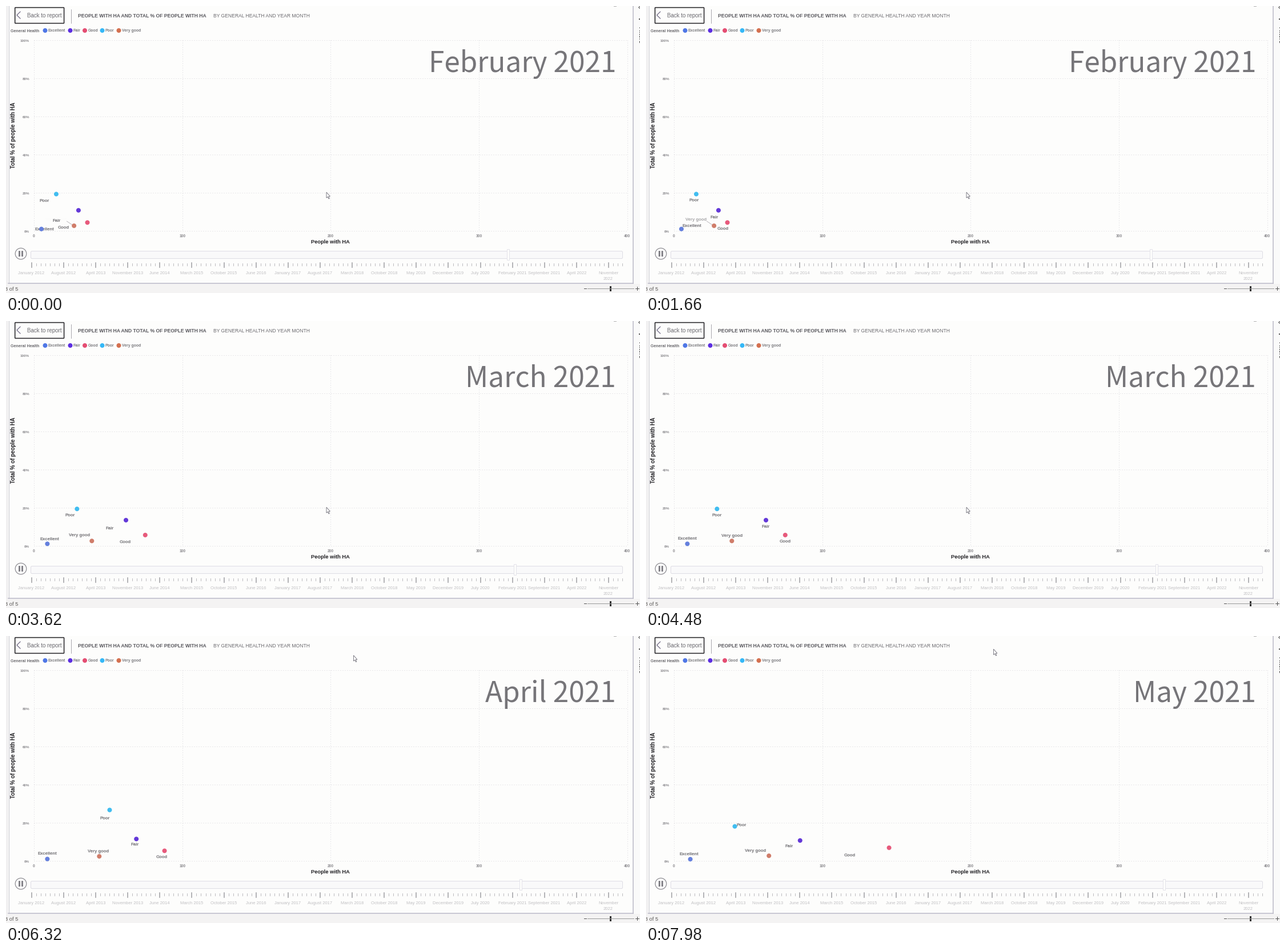
These frames come from a looping animation (1110x504 px, 8 s). A matplotlib script:

```python
import numpy as np
import matplotlib.pyplot as plt
from matplotlib.animation import FuncAnimation
from matplotlib.patches import Circle, Polygon, Rectangle, FancyBboxPatch

W, H, DPI = 1110, 504, 96
PX = 72 / DPI                      # points per pixel
STEP, LOOP = 20, 8000              # ms
MONTH_MS, GLIDE_MS, LEAD_MS = 2300, 2050, 20
PAPER = "#fdfdfc"

plt.rcParams["font.family"] = "Liberation Sans"
fig = plt.figure(figsize=(W / DPI, H / DPI), dpi=DPI, facecolor=PAPER)


def stage():
    ax = fig.add_axes([0, 0, 1, 1])
    ax.set(xlim=(0, W), ylim=(H, 0))
    ax.axis("off")
    return ax


def text(ax, x, y, s, size, color, ha="center", **kw):
    """Text whose capitals are vertically centred on y; size in pixels."""
    return ax.text(x, y + 0.36 * size, s, fontsize=size * PX, color=color,
                   ha=ha, va="baseline", **kw)


def line(ax, xs, ys, color, width=1, **kw):
    return ax.plot(xs, ys, color=color, lw=width * PX, **kw)[0]


def box(ax, x0, y0, x1, y1, fill="none", edge="none", width=1, **kw):
    return ax.add_patch(Rectangle((x0, y0), x1 - x0, y1 - y0, facecolor=fill,
                                  edgecolor=edge, lw=width * PX, **kw))


def chart_xy(people, percent):
    return 49 + 2.597 * np.asarray(people), 395.3 - 3.35 * np.asarray(percent)


NAMES = ["Excellent", "Fair", "Good", "Poor", "Very good"]


def draw_window(ax):
    box(ax, 0, 0, 4, H, "#f1f0f1")
    box(ax, 1099, 0, W, H, "#fafafa")
    box(ax, 0, 488, W, H, "#f4f3f3")
    line(ax, [4.5, 4.5], [0, 487], "#c8c7d0")
    line(ax, [1098, 1098], [0, 487], "#b9b7c6", 1.5)
    line(ax, [4, 1098], [487, 487], "#b9b7c6", 1.5)
    text(ax, 21, 497, "3 of 5", 9.4, "#605e5c", "right")
    line(ax, [1012, 1016], [495.5, 495.5], "#555555")
    line(ax, [1018, 1099], [495.5, 495.5], "#9a9a9a")
    box(ax, 1057, 492, 1060, 501, "#333333")
    line(ax, [1102, 1108], [495.5, 495.5], "#555555")
    line(ax, [1105, 1105], [492.5, 498.5], "#555555")
    ax.text(1110, 51, "Filters", fontsize=10 * PX, weight="bold",
            color="#3b3a39", rotation=270, ha="center", va="center")
    line(ax, [1110, 1107.5, 1110], [0.5, 2.5, 4.5], "#555555")
    box(ax, 1107.5, 21.5, 1110, 23.5, "#555555")
    line(ax, [1064, 1068], [0.3, 0.3], "#b0b0b0")


def draw_header(ax):
    ax.add_patch(FancyBboxPatch((15.7, 2.7), 85.9, 27.7, facecolor=PAPER,
                                boxstyle="round,pad=0,rounding_size=1",
                                edgecolor="#2b2a2e", lw=1.6 * PX))
    line(ax, [25, 19, 25], [10, 16, 22], "#6a6480", 1.2)
    text(ax, 67, 16.5, "Back to report", 9.8, "#6b6a70")
    line(ax, [113.5, 113.5], [6, 30], "#a9a8ad")
    text(ax, 126, 16.5, "PEOPLE WITH HA AND TOTAL % OF PEOPLE WITH HA", 8.54,
         "#55545a", "left", weight="bold")
    text(ax, 363, 16.5, "BY GENERAL HEALTH AND YEAR MONTH", 8.56,
         "#6a696e", "left")
    text(ax, 8, 43, "General Health", 7.1, "#6f6e72", "left", weight="bold")
    tones = ["#4f77e6", "#5c2de0", "#e44d72", "#35b8f7", "#d4704f"]
    for x, name, tone in zip([68.5, 112.5, 138, 168.5, 197.5], NAMES, tones):
        ax.add_patch(Circle((x, 43), 4, color=tone, lw=0))
        text(ax, x + 5.5, 43, name, 6.9, "#7d7c80", "left", weight="bold")


def draw_axes(ax):
    grid = dict(color="#d6d5da", width=1, linestyle=(0, (1, 3)))
    for pct in range(0, 101, 20):
        y = chart_xy(0, pct)[1]
        line(ax, [49, 1088], [y, y], **grid)
        text(ax, 41, y, f"{pct}%", 6.3, "#8a898d", "right", weight="bold")
    for n in range(0, 401, 100):
        x = chart_xy(n, 0)[0]
        line(ax, [x, x], [60, 395], **grid)
        text(ax, x, 403.5, str(n), 6.6, "#8a898d", weight="bold")
    text(ax, 568, 414, "People with HA", 9.3, "#1f1e22", weight="bold")
    ax.text(13.3, 227, "Total % of people with HA", fontsize=9.5 * PX,
            color="#1f1e22", weight="bold", rotation=90,
            ha="center", va="center")


def draw_timeline(ax):
    ax.add_patch(Circle((26, 435), 9.8, facecolor=PAPER,
                        edgecolor="#8b8a90", lw=1.2 * PX))
    box(ax, 22, 430, 24.6, 440, "#85848a")
    box(ax, 27.2, 430, 29.8, 440, "#85848a")
    ax.add_patch(FancyBboxPatch((43.5, 430.5), 1036, 13, facecolor="#f9f9fa",
                                boxstyle="round,pad=0,rounding_size=2",
                                edgecolor="#dedde5", lw=PX))
    pitch = 56.13 / 7
    for n in range(130):
        x = 44.8 + n * pitch
        if n % 7:
            line(ax, [x, x], [452, 455.5], "#bcbbbf")
        else:
            line(ax, [x, x], [451, 459], "#a3a2a7", 1.6)
    labels = ["January 2012", "August 2012", "April 2013", "November 2013",
              "June 2014", "March 2015", "October 2015", "June 2016",
              "January 2017", "August 2017", "March 2018", "October 2018",
              "May 2019", "December 2019", "July 2020", "February 2021",
              "September 2021", "April 2022", "November"]
    for n, label in enumerate(labels):
        text(ax, 44.5 + 56.13 * n, 468, label, 7.6, "#c2c1c4")
    text(ax, 1054.5, 478.5, "2022", 7.6, "#c2c1c4")


# Render the unchanging parts once and reuse them as a backdrop.
base = stage()
for part in (draw_window, draw_header, draw_axes, draw_timeline):
    part(base)
fig.canvas.draw()
backdrop = np.array(fig.canvas.buffer_rgba())
base.remove()
fig.figimage(backdrop, origin="upper", zorder=-1)

# One row per month, columns in the order of NAMES.
MONTHS = ["February 2021", "March 2021", "April 2021", "May 2021"]
PEOPLE = [[5, 30, 36, 15, 27], [9, 62, 75, 29, 39],
          [9, 69, 88, 51, 44], [11, 85, 145, 41, 64]]
PERCENT = [[1.1, 10.9, 4.5, 19.4, 2.8], [1.2, 13.6, 5.8, 19.5, 2.7],
           [1.1, 11.6, 5.4, 26.8, 2.5], [1.0, 10.8, 7.0, 18.2, 2.8]]
dots = np.stack(chart_xy(PEOPLE, PERCENT), axis=-1)

offset = np.array([[0, -10], [0, 10], [0, 10], [0, 10], [0, -10]])
before = [[67, 391], [88, 376.5], [100, 388], [67, 341], [88, 374]]
spots = np.concatenate([[before], dots + offset])
spots[1, 0] = 82.9, 384            # crowded labels are pushed aside
spots[1, 4] = 88, 374

ax = stage()
month = ax.text(1068, 116, "", fontsize=49.5 * PX, color="#767579",
                family="Noto Sans CJK JP", ha="right", va="baseline")
leader = line(ax, [106.5, 117], [378, 385], "#b9b8bc", 0.9, zorder=1.5)
LABEL_SIZE = 7.8
labels = [text(ax, 0, 0, name, LABEL_SIZE, "#737276", weight="bold", zorder=2)
          for name in NAMES]
marks = ax.scatter(*dots[0].T, s=(8 * PX) ** 2, lw=0, zorder=3,
                   c=["#6580dd", "#6338d8", "#e75a7c", "#41bdf0", "#d07d6a"])
handle = box(ax, 0, 427, 4, 446, PAPER, "#e4e3ea", zorder=3)
ARROW = np.array([[0, 0], [0, 10], [2.2, 8], [4, 11.6], [5.3, 11],
                  [3.7, 7.4], [6.4, 7.3]])
cursor = ax.add_patch(Polygon(ARROW, facecolor="white", edgecolor="#77767f",
                              lw=0.9 * PX, zorder=5))

CURSOR_T = [5240, 5340, 5480, 5760, 5980, 6320, 6600, 6800]
CURSOR_X = [561, 568, 583.5, 601, 608.5, 608.5, 608.5, 608.5]
CURSOR_Y = [327, 308, 246, 100, 38, 34, 25, 23]


def update(i):
    t = i * STEP
    k, since = divmod(t + LEAD_MS, MONTH_MS)
    p = min(1, since / GLIDE_MS)

    month.set_text(MONTHS[k])
    marks.set_offsets(dots[k])
    for label, (x, y) in zip(labels, spots[k] + p * (spots[k + 1] - spots[k])):
        label.set_position((x, y + 0.36 * LABEL_SIZE))
    labels[4].set_alpha(0.75 * p if k == 0 else 1)
    leader.set_visible(k == 0)

    handle.set_x(876.5 + 3.51 * t / 1000)
    tip = [np.interp(t, CURSOR_T, CURSOR_X), np.interp(t, CURSOR_T, CURSOR_Y)]
    cursor.set_xy(ARROW + tip)
    return [month, marks, leader, handle, cursor, *labels]


anim = FuncAnimation(fig, update, frames=LOOP // STEP, interval=STEP,
                     repeat=True, repeat_delay=0, blit=False)
plt.show()
```
